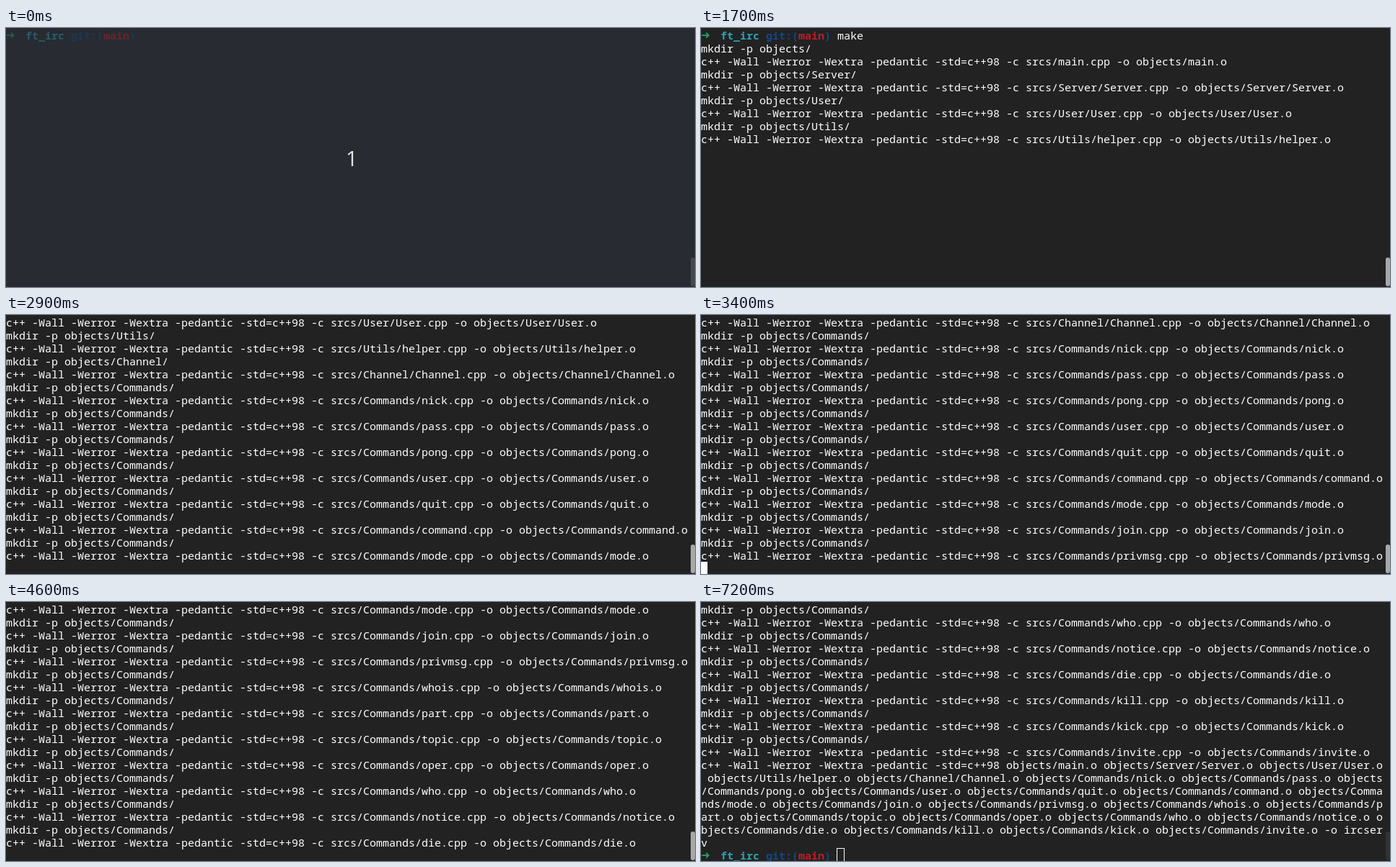
Animation, 955 px wide and 360 px high, one loop 7.3 s. Source, as an HTML page:

```html
<!DOCTYPE html>
<html lang="en">
<head>
<meta charset="utf-8">
<title>Terminal build</title>
<style>
  html, body { margin: 0; width: 100%; height: 100%; overflow: hidden; background: #222; }
  #stage { position: relative; width: 955px; height: 360px; overflow: hidden; background: #222; }
  #log { position: absolute; left: 0; top: 1px; font: 15px/18px "Noto Sans Mono", monospace; color: #fff; white-space: pre; }
  #log div { height: 18px; }
  b { font-weight: 700; }
  .arrow { position: absolute; left: 0; font-family: "DejaVu Sans", sans-serif; color: #26a269; }
  .dir { color: #2aa1b3; }
  .git { color: #12488b; }
  .branch { color: #c01c28; }
  #cursor { position: absolute; box-sizing: border-box; width: 9px; height: 18px; background: #fff; }
  #cursor.hollow { width: 11px; height: 19px; margin: -1px 0 0 -1px; background: none; border: 1px solid #fff; }
  #bar { position: absolute; left: 949px; top: 319px; width: 6px; height: 40px; border-radius: 3px; background: #a8a8a8; }
  #count { position: absolute; left: 471px; top: 161px; font: 29px/40px "Open Sans", sans-serif; color: #e4e4e4; }
  #stage.intro { background: #282b31; }
  .intro #log { opacity: .42; }
  .intro #bar { background: #46484d; }
  .outro #bar { background: #323232; }
</style>
</head>
<body>
<div id="stage">
  <div id="log"></div>
  <div id="cursor"></div>
  <div id="bar"></div>
  <div id="count">1</div>
</div>
<script>
const LOOP = 7300, COLS = 105, ROWS = 20, CELL_W = 9, CELL_H = 18, PROMPT_COLS = 21;
const $ = id => document.getElementById(id);
const stage = $('stage'), log = $('log'), cursor = $('cursor'), count = $('count');

const commands = 'nick pass pong user quit command mode join privmsg whois part topic oper who notice die kill kick invite';
const files = ['main', 'Server/Server', 'User/User', 'Utils/helper', 'Channel/Channel',
  ...commands.split(' ').map(name => 'Commands/' + name)];
const compiledAt = [1000, 1200, 1500, 1700, 1800, 2000, 2200, 2300, 2400, 2600, 2700, 2900,
  3200, 3400, 3600, 3700, 4000, 4100, 4300, 4400, 4600, 4700, 4900, 5100];
const typing = [[600, 'ma'], [700, 'mak'], [900, 'make']];
const LINK = 5200, DONE = 5300, BLUR = 7200;
// Cursor toggles, starting hidden.
const blinks = [400, 1600, 2200, 2800, 3400, 4000, 4700, 5200, 5800, 6400, 7000];

const cc = 'c++ -Wall -Werror -Wextra -pedantic -std=c++98 ';
const prompt = '<b class="arrow">➜</b>   <b class="dir">ft_irc</b> <b class="git">git:(</b>' +
  '<b class="branch">main</b><b class="git">)</b> ';

const lines = [];
function addLine(text, html) {
  const el = document.createElement('div');
  if (html) el.innerHTML = html; else el.textContent = text;
  log.append(el);
  lines.push(el);
  return el;
}

addLine('', prompt);
const typed = document.createElement('span');
lines[0].append(typed);
for (const file of files) {
  const dir = file.slice(0, file.indexOf('/') + 1);
  addLine(`mkdir -p objects/${dir}`);
  addLine(`${cc}-c srcs/${file}.cpp -o objects/${file}.o`);
}
const link = cc + files.map(file => `objects/${file}.o`).join(' ') + ' -o ircserv';
for (let i = 0; i < link.length; i += COLS) addLine(link.slice(i, i + COLS));
addLine('', prompt);

const passed = (times, t) => times.filter(at => at <= t).length;

function shownLines(t) {
  if (t >= DONE) return lines.length;
  if (t >= LINK) return lines.length - 1;
  return 1 + 2 * passed(compiledAt, t);
}

function render(t) {
  const shown = shownLines(t);
  const word = typing.reduce((text, [at, next]) => t >= at ? next : text, '');
  const editing = shown === 1 || t >= DONE;
  const row = editing ? shown - 1 : shown;
  const col = editing ? PROMPT_COLS + (t >= DONE ? 0 : word.length) : 0;
  const top = Math.max(0, row - ROWS + 1);

  typed.textContent = word;
  lines.forEach((el, i) => el.style.visibility = i >= top && i < shown ? 'visible' : 'hidden');
  log.style.top = 1 - top * CELL_H + 'px';

  cursor.style.left = col * CELL_W + 'px';
  cursor.style.top = 1 + (row - top) * CELL_H + 'px';
  cursor.style.visibility = passed(blinks, t) % 2 ? 'visible' : 'hidden';
  cursor.className = t >= BLUR ? 'hollow' : '';

  stage.className = t < 100 ? 'intro' : t >= BLUR ? 'outro' : '';
  count.style.visibility = t < 100 ? 'visible' : 'hidden';
}

const start = performance.now();
function tick() {
  render((performance.now() - start) % LOOP);
  requestAnimationFrame(tick);
}
tick();
</script>
</body>
</html>
```
